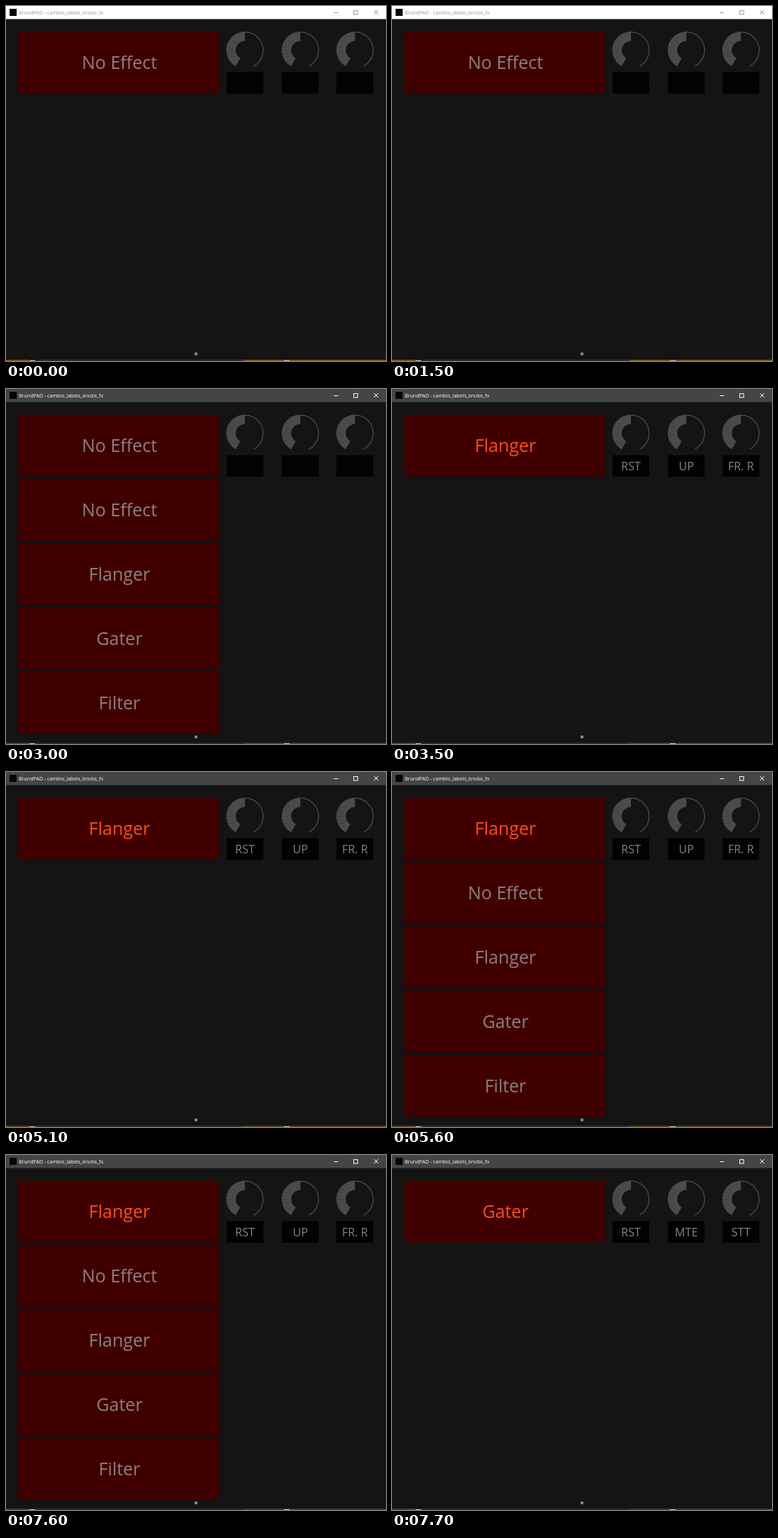
These frames come from a looping animation (536x502 px, 8 s). An HTML page with a canvas:

```html
<!DOCTYPE html>
<html lang="en">
<head>
<meta charset="utf-8">
<title>Effect selector</title>
<style>
  html, body { margin: 0; width: 100%; height: 100%; overflow: hidden; background: #141414; }
  canvas { display: block; width: 536px; height: 502px; }
</style>
</head>
<body>
<canvas id="stage" width="536" height="502"></canvas>
<script>
const ctx = document.getElementById('stage').getContext('2d');
const W = 536, H = 502, LOOP = 8000;
const FONT = '"Open Sans", "Noto Sans", sans-serif';
const GREY = '#8c8080', ORANGE = '#ff4b1c';
const OPTIONS = ['No Effect', 'Flanger', 'Gater', 'Filter'];
const KNOBS = [337, 415.2, 492.2];

// Each step holds until the next one starts.
const STEPS = [
  { at: 0, effect: 'No Effect', labels: [], open: false, active: false },
  { at: 2000, effect: 'No Effect', labels: [], open: true, active: true },
  { at: 3500, effect: 'Flanger', labels: ['RST', 'UP', 'FR. R'], open: false, active: true },
  { at: 5600, effect: 'Flanger', labels: ['RST', 'UP', 'FR. R'], open: true, active: true },
  { at: 7700, effect: 'Gater', labels: ['RST', 'MTE', 'STT'], open: false, active: true }
];

function rect(x, y, w, h, color) {
  ctx.fillStyle = color;
  ctx.fillRect(x, y, w, h);
}

function text(str, x, y, size, color, align = 'center') {
  ctx.font = `${size}px ${FONT}`;
  ctx.textAlign = align;
  ctx.fillStyle = color;
  ctx.fillText(str, x, y);
}

function line(x1, y1, x2, y2) {
  ctx.beginPath();
  ctx.moveTo(x1, y1);
  ctx.lineTo(x2, y2);
  ctx.stroke();
}

function titleBar(active) {
  const ink = active ? '#ffffff' : '#999999';
  rect(0, 0, W, 18.5, active ? '#454545' : '#ffffff');
  rect(5, 4, 10, 10, '#050505');
  text('BrundPAD - cambio_labels_knobs_fx', 18, 12, 7.1, ink, 'left');
  ctx.strokeStyle = ink;
  ctx.lineWidth = 1;
  line(462.5, 9.5, 468.5, 9.5);
  ctx.strokeRect(490.5, 6.5, 5.5, 5.5);
  line(519, 6, 525, 12);
  line(525, 6, 519, 12);
}

function button(row, label, color) {
  const y = 36 + row * 91;
  rect(17, y, 284, 88, '#2c0303');
  rect(18, y + 1, 282, 86, '#400000');
  text(label, 160, y + 53, 25, color);
}

function knob(x, label) {
  const y = 62.5, rad = Math.PI / 180;
  ctx.beginPath();
  ctx.arc(x, y, 26.3, 120 * rad, 270 * rad);
  ctx.arc(x, y, 13, 270 * rad, 120 * rad, true);
  ctx.closePath();
  ctx.fillStyle = '#4b4b4b';
  ctx.fill();

  ctx.strokeStyle = '#3c3c3c';
  ctx.lineWidth = 0.8;
  for (let a = 140; a <= 220; a += 13) {
    const c = Math.cos(a * rad), s = Math.sin(a * rad);
    line(x + 17 * c, y + 17 * s, x + 25 * c, y + 25 * s);
  }

  ctx.beginPath();
  ctx.arc(x, y, 25.7, 270 * rad, 422 * rad);
  ctx.strokeStyle = '#505050';
  ctx.lineWidth = 1.2;
  ctx.stroke();

  rect(Math.round(x - 26), 93.5, 52, 30.5, '#020202');
  if (label) text(label, x, 115, 16, '#858585');
}

function desktopEdge(active) {
  const gold = active ? '#5c430c' : '#80600c';
  rect(0, 500, W, 2, '#292c2f');
  rect(0, 500.5, 32, 1.5, gold);
  rect(335, 500.5, W - 335, 1.5, gold);
  for (const x of [33, 392]) rect(x, 501, 8, 1, '#c4cdd2');
}

function draw(t) {
  const s = STEPS.filter(step => step.at <= t).pop();
  rect(0, 0, W, H, '#141414');
  titleBar(s.active);
  button(0, s.effect, s.effect === 'No Effect' ? GREY : ORANGE);
  if (s.open) OPTIONS.forEach((name, i) => button(i + 1, name, GREY));
  KNOBS.forEach((x, i) => knob(x, s.labels[i]));
  ctx.beginPath();
  ctx.arc(268, 492, 2.3, 0, Math.PI * 2);
  ctx.fillStyle = '#858585';
  ctx.fill();
  desktopEdge(s.active);
}

const start = performance.now();
function tick() {
  draw((performance.now() - start) % LOOP);
  requestAnimationFrame(tick);
}
tick();
</script>
</body>
</html>
```
